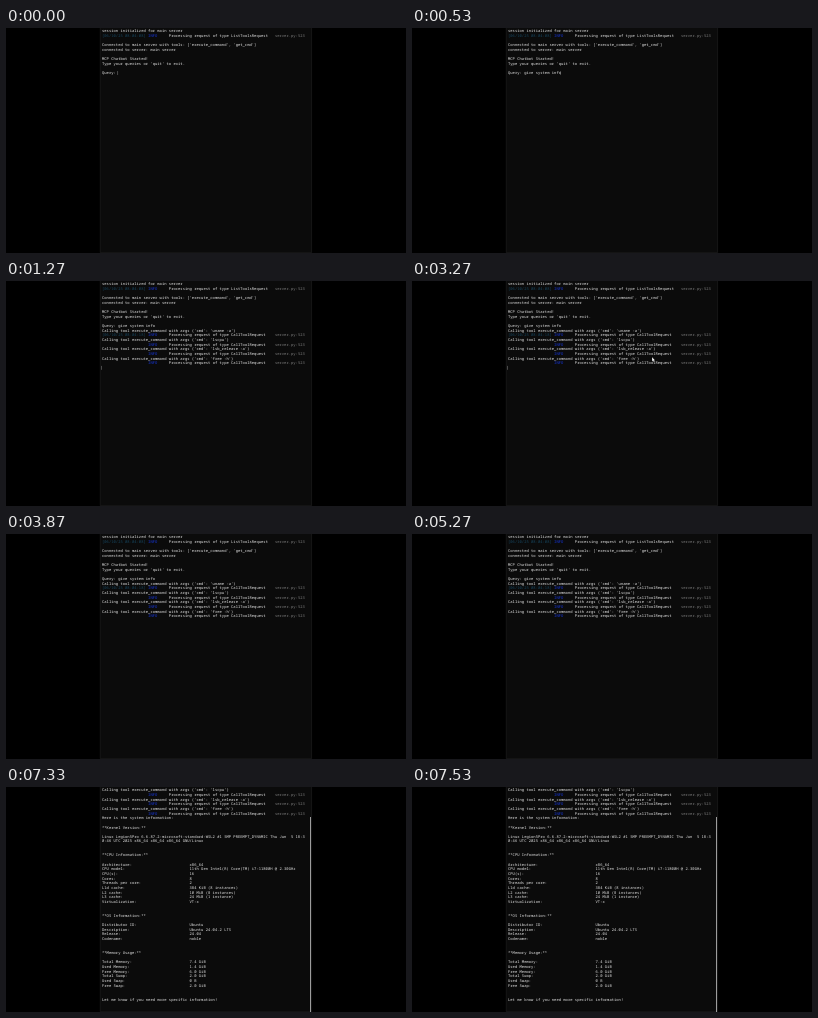
Animation of 400x225 px, one loop 7.6 s. Source, as an HTML page:

```html
<!DOCTYPE html>
<html lang="en">
<head>
<meta charset="utf-8">
<title>Terminal chat session</title>
<style>
  html, body { margin: 0; width: 100%; height: 100%; overflow: hidden; background: #000; }
  svg { display: block; width: 100%; height: 100%; }
  text {
    font: 500 38.42px "Noto Sans Mono", "DejaVu Sans Mono", monospace;
    white-space: pre;
    text-rendering: geometricPrecision;
    fill: #e4e4e4;
  }
  .time { fill: #17465f; }
  .info { fill: #1638e4; }
  .path { fill: #7c7c7c; }
</style>
</head>
<body>
<svg viewBox="0 0 400 225" xmlns="http://www.w3.org/2000/svg">
  <rect width="400" height="225" fill="#000"/>
  <rect x="94" width="212" height="225" fill="#0b0b0b"/>
  <path d="M94.25 0V224.7H305.6V0" fill="none" stroke="#202020" stroke-width=".5"/>
  <g id="lines" transform="scale(.1)"></g>
  <rect id="caret" width=".5" height="3.9" fill="#888"/>
  <rect id="scrollbar" width="1" height="195" fill="#9c9c9c"/>
  <path id="pointer" d="M0 0V4.6L1.1 3.7L1.9 5.4L2.6 5.1L1.9 3.4H3.2Z" fill="#fff" stroke="#000" stroke-width=".25"/>
</svg>
<script>
const LOOP = 7600;
const LEFT = 96, ADVANCE = 2.305, BASE = 4.3, PITCH = 4.65;
const QUERY = "give system info";

const $ = id => document.getElementById(id);
const lines = $("lines"), caret = $("caret"), scrollbar = $("scrollbar"), pointer = $("pointer");

const colX = col => LEFT + col * ADVANCE;
const rowY = row => BASE + row * PITCH;
const escape = s => s.replace(/&/g, "&amp;").replace(/</g, "&lt;");

// A line is a list of [column, text, class] parts.
const plain = text => [[0, text, ""]];
const log = (type, stamp = "") => [
  [0, stamp, "time"],
  [20, "INFO", "info"],
  [29, `Processing request of type ${type}`, ""],
  [75, "server.py:523", "path"]
];
const call = (cmd, stamp) => [
  plain(`Calling tool execute_command with args {'cmd': '${cmd}'}`),
  log("CallToolRequest", stamp)
];
const field = (name, value) => plain((name + ":").padEnd(38) + value);
const gap = n => Array(n).fill(plain(""));
const section = (title, fields) =>
  [...gap(2), plain(`**${title}:**`), ...gap(1), ...fields.map(f => field(...f))];

const intro = [
  plain("session initialized for main server"),
  log("ListToolsRequest", "[06/10/25 08:04:08]"),
  plain(""),
  plain("Connected to main server with tools: ['execute_command', 'get_cmd']"),
  plain("connected to server: main server"),
  plain(""),
  plain("MCP Chatbot Started!"),
  plain("Type your queries or 'quit' to exit."),
  plain("")
];

const calls = [
  ...call("uname -a", "[06/10/25 08:04:18]"),
  ...call("lscpu"),
  ...call("lsb_release -a"),
  ...call("free -h")
];

const answer = [
  plain("Here is the system information:"),
  ...gap(1),
  plain("**Kernel Version:**"),
  ...gap(1),
  plain("Linux Legion5Pro 6.6.87.2-microsoft-standard-WSL2 #1 SMP PREEMPT_DYNAMIC Thu Jun  5 18:3"),
  plain("0:46 UTC 2025 x86_64 x86_64 x86_64 GNU/Linux"),
  ...section("CPU Information", [
    ["Architecture", "x86_64"],
    ["CPU model", "11th Gen Intel(R) Core(TM) i7-11800H @ 2.30GHz"],
    ["CPU(s)", "16"],
    ["Cores", "8"],
    ["Threads per core", "2"],
    ["L1d cache", "384 KiB (8 instances)"],
    ["L2 cache", "10 MiB (8 instances)"],
    ["L3 cache", "24 MiB (1 instance)"],
    ["Virtualization", "VT-x"]
  ]),
  ...section("OS Information", [
    ["Distributor ID", "Ubuntu"],
    ["Description", "Ubuntu 24.04.2 LTS"],
    ["Release", "24.04"],
    ["Codename", "noble"]
  ]),
  ...section("Memory Usage", [
    ["Total Memory", "7.4 GiB"],
    ["Used Memory", "1.4 GiB"],
    ["Free Memory", "6.0 GiB"],
    ["Total Swap", "2.0 GiB"],
    ["Used Swap", "0 B"],
    ["Free Swap", "2.0 GiB"]
  ]),
  ...gap(2),
  plain("Let me know if you need more specific information!")
];

// Value of the last [time, value] step already reached.
const stepAt = (steps, t) => steps.reduce((v, [at, next]) => t >= at ? next : v, 0);

const typing = [[70, 2], [130, 5], [200, 7], [270, 10], [330, 12], [470, 14], [530, 16]];
const output = [[1130, 2], [1200, 4], [1270, 8]];

function screenAt(t) {
  if (t >= 6530) return [...calls.slice(2), ...answer];
  const typed = QUERY.slice(0, stepAt(typing, t));
  return [...intro, plain("Query: " + typed), ...calls.slice(0, stepAt(output, t))];
}

const drawLine = (line, row) => line
  .filter(([, text]) => text)
  .map(([col, text, cls]) =>
    `<text class="${cls}" x="${colX(col) * 10}" y="${rowY(row) * 10}">${escape(text)}</text>`)
  .join("");

function place(node, visible, x, y) {
  node.setAttribute("visibility", visible ? "visible" : "hidden");
  node.setAttribute("transform", `translate(${x} ${y})`);
}

let shown = "";
function render(t) {
  const screen = screenAt(t);
  const markup = screen.map(drawLine).join("");
  if (markup !== shown) lines.innerHTML = shown = markup;

  const entered = t >= 670;
  const col = entered ? 0 : 7 + stepAt(typing, t);
  const row = entered ? screen.length : screen.length - 1;
  place(caret, t < 3730, colX(col) - .6, rowY(row) - 3.1);
  place(scrollbar, t >= 6670, 304, 30);
  place(pointer, t >= 3270 && t < 3330, 240, 76);
}

const start = performance.now();
function tick() {
  render((performance.now() - start) % LOOP);
  requestAnimationFrame(tick);
}
tick();
</script>
</body>
</html>
```
